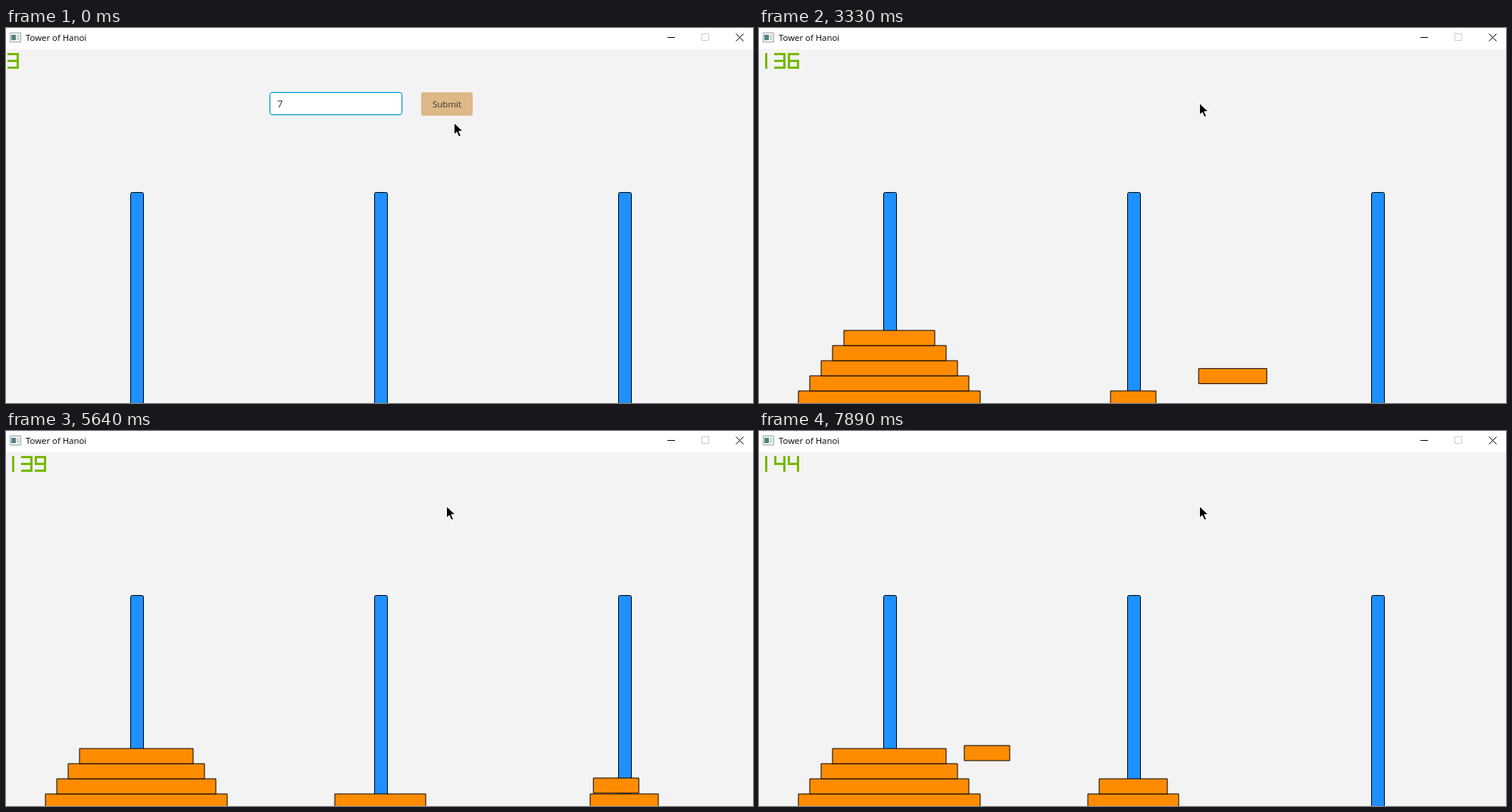
An HTML page with a canvas for the animation above (8000 ms loop, 986 by 496 pixels).

```html
<!DOCTYPE html>
<html lang="en">
<head>
<meta charset="utf-8">
<title>Tower of Hanoi</title>
<style>
html, body { margin: 0; width: 100%; height: 100%; overflow: hidden; background: #f3f3f3; }
canvas { display: block; }
</style>
</head>
<body>
<canvas id="stage" width="986" height="496"></canvas>
<script>
const ctx = document.getElementById('stage').getContext('2d');
const FONT = '"Open Sans", "Noto Sans", sans-serif';
const LOOP = 8000;
const SUBMIT = 1620;
const FIRST_MOVE = 1737;
const MOVE = 958.5;
const FIRST_READING = 2260;
const BLINK = 480;
const DISKS = 7;
const readings = [3, 71, 136, 144, 139, 141, 144];

const moves = [];
function solve(n, a, b, c) {
  if (!n) return;
  solve(n - 1, a, c, b);
  moves.push([a, b]);
  solve(n - 1, c, b, a);
}
solve(DISKS, 0, 1, 2);

// Digit strokes over a 3 x 3 grid of points, a to i
const strokes = { 1: 'bh', 3: 'acig df', 4: 'adf ci', 6: 'cagifd', 7: 'aci', 9: 'fdacig' };

const clamp = (v, lo, hi) => Math.max(lo, Math.min(hi, v));
const mix = (a, b, p) => a + (b - a) * p;
const pegX = peg => 172 + 322 * peg;
const rowY = row => 480 - 20 * row;

// Constant speed with a short ramp at both ends
function ease(t) {
  if (t < 0.2) return 3.125 * t * t;
  if (t > 0.8) return 1 - 3.125 * (1 - t) ** 2;
  return 1.25 * t - 0.125;
}

function box(x, y, w, h, fill, stroke, r = 0) {
  ctx.beginPath();
  ctx.roundRect(x, y, w, h, r);
  if (fill) { ctx.fillStyle = fill; ctx.fill(); }
  if (stroke) { ctx.strokeStyle = stroke; ctx.stroke(); }
}

function text(str, x, y, size, color) {
  ctx.font = `${size}px ${FONT}`;
  ctx.fillStyle = color;
  ctx.fillText(str, x, y);
}

function line(x1, y1, x2, y2) {
  ctx.strokeStyle = '#000';
  ctx.beginPath();
  ctx.moveTo(x1, y1);
  ctx.lineTo(x2, y2);
  ctx.stroke();
}

function drawTitleBar() {
  box(0, 0, 986, 28, '#fff');
  box(5.5, 6.5, 14, 12, '#f4f6f7', '#9aa2a6');
  box(7, 9, 6, 7, '#4f8580');
  box(14, 9, 4, 7, '#d3d9dc');
  text('Tower of Hanoi', 26, 17, 11.4, '#000');
  line(873, 12.5, 883, 12.5);
  box(918.5, 7.5, 9, 9, null, '#ccc');
  line(963.5, 7.5, 973.5, 17.5);
  line(973.5, 7.5, 963.5, 17.5);
}

function drawCounter(t) {
  const n = Math.floor((t - FIRST_READING) / MOVE) + 1;
  const value = readings[clamp(n, 0, readings.length - 1)];
  ctx.save();
  ctx.strokeStyle = '#76b900';
  ctx.lineWidth = 3;
  ctx.lineCap = 'square';
  ctx.translate(3.5, 34.5);
  for (const digit of String(value)) {
    for (const path of strokes[digit].split(' ')) {
      ctx.beginPath();
      for (const point of path) {
        const i = point.charCodeAt(0) - 97;
        ctx.lineTo(6 * (i % 3), 9 * Math.floor(i / 3));
      }
      ctx.stroke();
    }
    ctx.translate(18, 0);
  }
  ctx.restore();
}

function drawForm(t) {
  box(347.5, 84.5, 176, 31, null, 'rgba(3,158,211,.3)', 4);
  box(348.5, 85.5, 174, 29, '#fff', '#039ed3', 3);
  text('7', 358, 105, 13, '#333');
  if (Math.floor((t + 100) / BLINK) % 2) line(365.5, 90, 365.5, 110);
  box(548, 85, 68, 31, '#deb887', null, 3);
  text('Submit', 563, 105, 11.5, '#333');
}

function drawDisk(size, x, y) {
  const w = 30 + 30 * size;
  box(x - w / 2, y, w, 20, '#ff8c00', '#000');
}

function drawDisks(t) {
  const pegs = [Array.from({ length: DISKS }, (_, i) => DISKS - i), [], []];
  const elapsed = Math.max(0, (t - FIRST_MOVE) / MOVE);
  const done = Math.floor(elapsed);
  for (const [a, b] of moves.slice(0, done)) pegs[b].push(pegs[a].pop());

  const [a, b] = moves[done];
  const flying = pegs[a].pop();
  const p = ease(elapsed - done);
  pegs.forEach((stack, peg) => stack.forEach((d, row) => drawDisk(d, pegX(peg), rowY(row))));
  drawDisk(flying, mix(pegX(a), pegX(b), p), mix(rowY(pegs[a].length), rowY(pegs[b].length), p));
}

function drawCursor(t) {
  const p = clamp(t / 680, 0, 1);
  const k = p * (2 - p);
  const arrow = new Path2D('M1 1.5V15L4.2 12L7 18L9 17.5L6.5 12L7 11H11Z');
  ctx.save();
  ctx.translate(mix(591, 581, k), mix(125, 99, k));
  ctx.strokeStyle = '#fff';
  ctx.lineWidth = 2;
  ctx.stroke(arrow);
  ctx.fillStyle = '#000';
  ctx.fill(arrow);
  ctx.restore();
}

function draw(t) {
  box(0, 0, 986, 496, '#f3f3f3');
  drawTitleBar();
  drawCounter(t);
  for (let peg = 0; peg < 3; peg++) box(pegX(peg) - 7.5, 217.5, 17, 300, '#1e90ff', '#000', 2);
  if (t < SUBMIT) drawForm(t);
  else drawDisks(t);
  drawCursor(t);
}

const origin = performance.now();
function loop() {
  draw((performance.now() - origin) % LOOP);
  requestAnimationFrame(loop);
}
loop();
</script>
</body>
</html>
```
